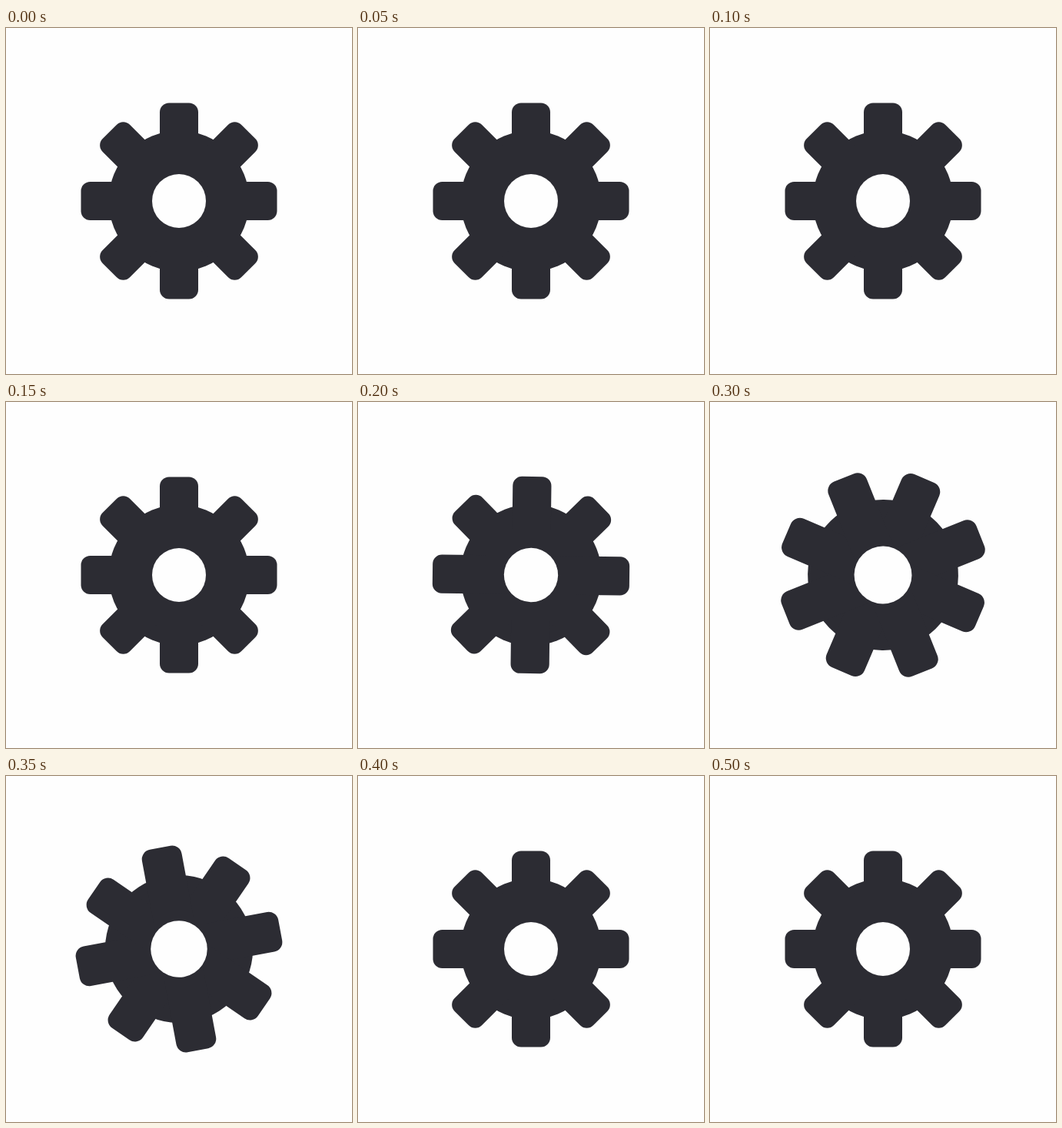
Animation of 450x450 px, one loop 0.55 s. Source, as an HTML page:

```html
<!DOCTYPE html>
<html lang="en">
<head>
<meta charset="utf-8">
<title>Turning gear</title>
<style>
  html, body { margin: 0; width: 100%; height: 100%; overflow: hidden; background: #fefefe; }
  svg { display: block; width: 100vw; height: 100vh; }
</style>
</head>
<body>
<svg viewBox="-225 -225 450 450">
  <defs>
    <rect id="bar" x="-25" y="-127.5" width="50" height="255" rx="12"/>
  </defs>
  <g id="gear" fill="#2c2c33">
    <circle r="91.5"/>
    <use href="#bar"/>
    <use href="#bar" transform="rotate(45)"/>
    <use href="#bar" transform="rotate(90)"/>
    <use href="#bar" transform="rotate(135)"/>
    <circle r="35" fill="#fefefe"/>
  </g>
</svg>
<script>
  const LOOP = 550, STEP = 50;       // ms
  const START = 197, DURATION = 200; // turn by one tooth, swelling midway
  const gear = document.getElementById('gear');

  function draw(now) {
    const time = Math.floor((now % LOOP) / STEP) * STEP;
    const p = Math.min(1, Math.max(0, (time - START) / DURATION));
    const scale = 1 + 0.07 * 4 * p * (1 - p);
    gear.setAttribute('transform', `rotate(${45 * p}) scale(${scale})`);
    requestAnimationFrame(draw);
  }
  draw(performance.now());
</script>
</body>
</html>
```
